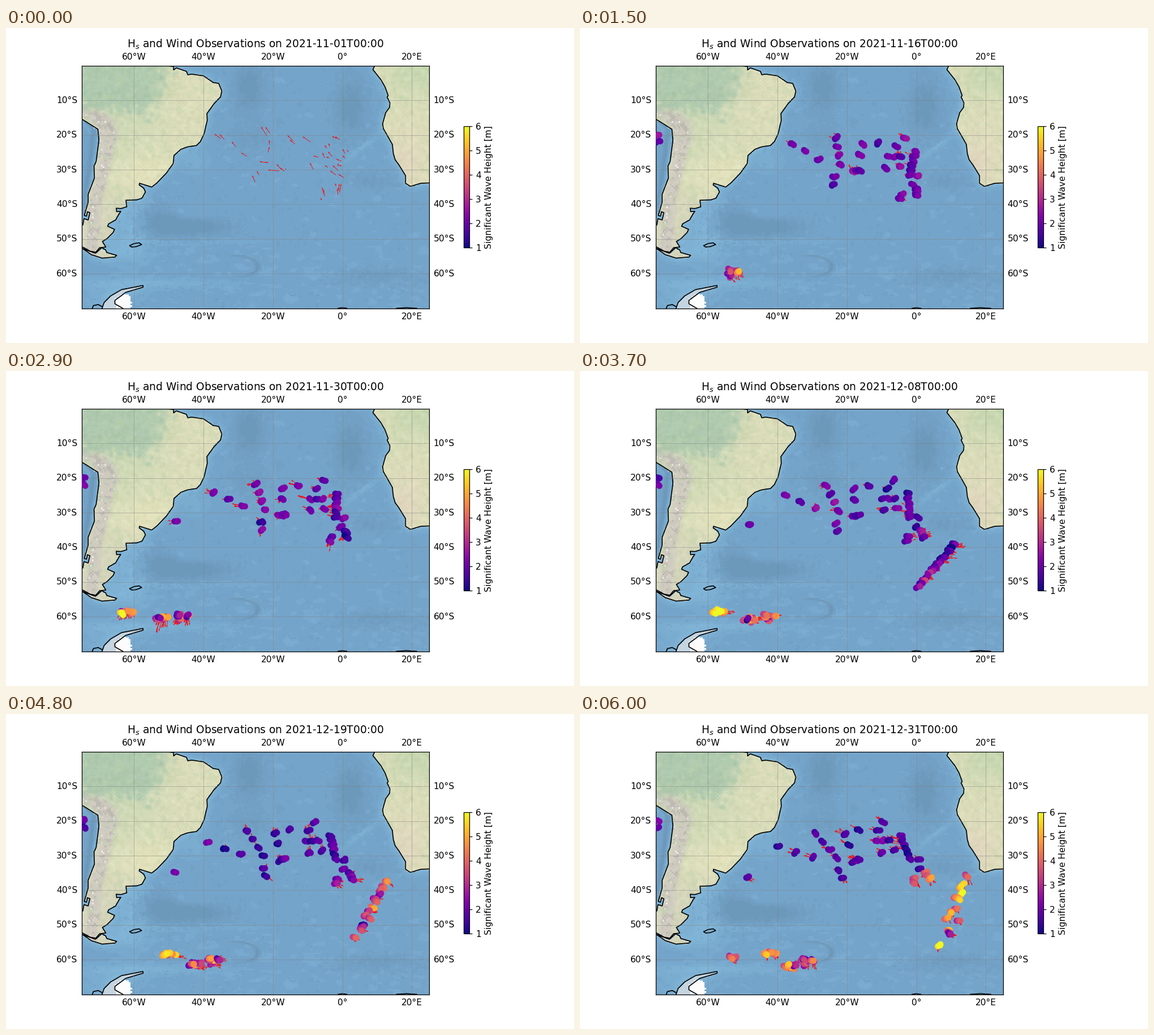
Write a matplotlib script that moves like this. It is 1004 by 558 pixels and loops after 6100 ms.

```python
import numpy as np
import matplotlib.pyplot as plt
from matplotlib.animation import FuncAnimation
from matplotlib.path import Path

W, H, DPI = 1004, 558, 111.555
TOP, BOTTOM, RIGHT = .12 * H, .89 * H, .745 * W
DEG = (BOTTOM - TOP) / 70
LEFT = RIGHT - 100 * DEG

plt.rcParams["font.family"] = "DejaVu Sans"
fig = plt.figure(figsize=((W + .001) / DPI, (H + .001) / DPI), dpi=DPI, facecolor="white")


def panel(x0, y0, x1, y1):
    return fig.add_axes([x0 / W, 1 - y1 / H, (x1 - x0) / W, (y1 - y0) / H])


def label(x, y, text, **kw):
    return fig.text(x / W, 1 - y / H, text, **kw)


def project(points):
    return np.array(points) * (DEG, -DEG) + (LEFT + 75 * DEG, TOP)


# Simplified coastlines as longitude, latitude
ATLANTIC = project([
    (-50.4, 0), (-48.6, -.2), (-48.6, -1.2), (-47.8, -.6), (-44.9, -1.6), (-44.5, -2.6),
    (-43.4, -2.4), (-40, -2.9), (-37.2, -4.8), (-35.6, -5.1), (-34.7, -7.3), (-35.1, -9),
    (-37, -11), (-39, -13.8), (-38.9, -15.7), (-39.8, -19.6), (-40.9, -21.9), (-42, -23),
    (-44.6, -23.4), (-46.5, -24.1), (-48.5, -25.9), (-48.7, -28.2), (-50.7, -31),
    (-53.4, -33.8), (-54.9, -35), (-58.4, -33.9), (-58.5, -34.4), (-57.2, -35.3),
    (-56.7, -36.4), (-57.7, -38.2), (-59.2, -38.7), (-62.3, -38.8), (-62.1, -40.7),
    (-63.8, -41.2), (-65.1, -41.1), (-65, -42.1), (-63.8, -42), (-64.4, -42.9),
    (-65.3, -44.5), (-67.3, -45.6), (-67.6, -46.3), (-65.6, -47.2), (-66, -48.1),
    (-67.8, -49.9), (-69.1, -50.7), (-68.1, -52.3), (-69.9, -52.5), (-71, -53.8),
    (-72.6, -53.5), (-75, -52.2)])
PACIFIC = project([
    (-75.2, -15.3), (-73.4, -16.4), (-70.4, -18.3), (-70.1, -21.4), (-70.9, -27.6),
    (-71.5, -28.9), (-71.4, -32.4), (-73.2, -37.1), (-73.2, -39.3), (-74.3, -43.2),
    (-73.7, -43.4), (-73.4, -42.1), (-72.7, -42.4), (-73.2, -44.5), (-74.4, -44.1),
    (-74.7, -45.8), (-75.6, -46.6)])
FUEGO = project([
    (-74.7, -52.8), (-71.1, -54.1), (-69.3, -52.5), (-68.2, -53.1), (-67.8, -53.9),
    (-65, -54.7), (-65.5, -55.2), (-69.2, -55.5), (-72.3, -54.5), (-74.7, -52.8)])
FALKLANDS = project([(-61.2, -51.9), (-60, -51.3), (-58.5, -51.1), (-57.8, -51.6),
                     (-59.4, -52.2), (-60.7, -52.3), (-61.2, -51.9)])
AFRICA = project([
    (9.3, 0), (8.8, -1.1), (11.1, -4), (12.3, -6.1), (13.2, -8.6), (12.9, -9), (13.7, -10.7),
    (13.6, -12), (12.5, -13.5), (11.6, -16.7), (11.8, -18.1), (13.4, -20.9), (14.4, -22.7),
    (14.7, -25.4), (15.2, -27.1), (16.3, -28.6), (18.2, -31.7), (18.2, -33.9), (19.6, -34.8),
    (22.6, -33.9), (25.2, -33.8)])
PENINSULA = project([
    (-69.2, -70), (-68.6, -68.3), (-66.7, -66.4), (-63.6, -64.6), (-57.4, -63.4),
    (-57.4, -63.9), (-62.4, -65.4), (-65.5, -67.7), (-65.5, -68.7), (-63.2, -70)])
COASTS = [ATLANTIC, PACIFIC, FUEGO, FALKLANDS, AFRICA, PENINSULA,
          project([(-72, -70), (-71.7, -69.2), (-70.3, -68.9), (-69.2, -69.5)]),
          project([(-1.2, -70), (0, -69.8), (1.3, -70)]),
          project([(15.6, -70), (18.5, -69.8), (21.4, -70)])]


# Relief picture with half-degree cells
def blur(a, steps):
    for _ in range(steps):
        p = np.pad(a, 1, "edge")
        a = (p[:-2, 1:-1] + p[2:, 1:-1] + p[1:-1, :-2] + p[1:-1, 2:] + a) / 5
    return a


def relief():
    rng = np.random.default_rng(7)
    nx, ny = 200, 140
    x, y = np.meshgrid(LEFT + (np.arange(nx) + .5) * DEG / 2,
                       TOP + (np.arange(ny) + .5) * DEG / 2)
    cells = np.column_stack([x.ravel(), y.ravel()])
    img = np.full((ny, nx, 3), (117., 164., 202.))

    def inside(*parts):
        return Path(np.vstack(parts)).contains_points(cells).reshape(ny, nx)

    def blob(cx, cy, sx, sy):
        return np.exp(-((x - cx) / sx) ** 2 - ((y - cy) / sy) ** 2)

    def step(v):
        return 1 / (1 + np.exp(-np.clip(v, -30, 30)))

    def noise(steps, wide=1):
        a = blur(rng.normal(size=(ny, nx)), steps)
        a = sum(np.roll(a, k, 1) for k in range(wide))
        return a / a.std()

    def mix(color, weight):
        img[:] += np.clip(weight, 0, 1)[..., None] * (np.array(color) - img)

    america = inside([(LEFT - 20, TOP)], ATLANTIC, PACIFIC[::-1]) | inside(FUEGO)
    africa = inside(AFRICA, [(RIGHT + 9, TOP)])
    ice = inside(PENINSULA)
    land = america | africa | ice

    shelf = blur(land.astype(float), 14) * 2.2
    shelf += .9 * blob(222, 350, 28, 55) + .6 * blob(205, 395, 45, 18)
    shelf += .7 * blob(250, 452, 130, 9) + .5 * blob(180, 470, 60, 25)
    shelf += .45 * blob(320, 378, 130, 6) + .5 * blob(330, 235, 28, 22)
    walvis = np.exp(-((y - 222 + .75 * (x - 615)) / 7) ** 2) * blob(628, 212, 34, 40)
    mix((128, 180, 215), np.round(np.clip(shelf + .75 * walvis, 0, 1) * 4) / 4)
    mix((126, 175, 211), .6 * ((noise(2, 4) > 1.75) & (blob(470, 300, 260, 230) > .2)))
    mix((126, 175, 211), .5 * ((noise(2, 5) > 1.1) & (y > 385)))

    basins = (blob(430, 105, 25, 45) + blob(610, 140, 26, 48) + blob(280, 342, 38, 27)
              + blob(345, 352, 50, 18) - .8 * blob(325, 325, 35, 14)
              + .5 * blob(640, 270, 40, 14) + .5 * blob(660, 440, 75, 14)
              + .4 * blob(430, 195, 35, 25))
    mix((108, 152, 186), np.round((1.2 * basins + .1 * noise(1)) * 3) / 3)
    arc = np.exp(-((np.hypot((x - 405) / 40, (y - 422) / 19) - 1) / .12) ** 2)
    mix((104, 143, 172), .65 * arc * step((x - 400) / 5) * step((440 - y) / 3))
    trench = np.interp(y, [160, 180, 250, 330], [134, 156, 148, 134])
    mix((103, 145, 178), .7 * np.exp(-((x - trench) / 5) ** 2) * (y > 165) * (y < 330))

    # Land is tinted on a copy so that tints stop at the coast
    sea = img.copy()
    img[:] = (220, 221, 186)
    mix((203, 216, 180), .8 * step((262 - x) / 18) * step((245 - y) / 18))
    rough = 8 * noise(2)
    mix((174, 201, 174), step((292 - x - .35 * (y - 67) + rough) / 7)
        * step((152 - y + rough) / 5))
    mix((227, 226, 188), blob(250, 260, 45, 40))
    mix((211, 212, 188), .8 * step((y - 300) / 12) * (x < 300))
    ridge = np.interp(y, [140, 165, 190, 240, 300, 400], [142, 172, 181, 174, 160, 150])
    width = np.interp(y, [140, 190, 230, 300], [25, 20, 13, 11])
    chain = np.exp(-((x - ridge) / width) ** 4) * step((y - 147) / 4) * (x < 260)
    mix((207, 201, 193), .9 * chain)
    mix((180, 175, 170), .6 * chain * (noise(1) > .8))
    mix((240, 240, 238), .8 * chain * (noise(0) > 1.9))
    mix((201, 216, 178), step((x - 680) / 12) * step((118 - y) / 12))
    mix((225, 212, 190), .8 * blob(705, 235, 28, 45))
    img[:] += (noise(1) * 3)[..., None] * np.array([1, .9, 1.1])
    mix((190, 212, 170), .35 * (noise(2) > 1.2))
    img[:] = np.where((america | africa)[..., None], img, sea)
    mix((214, 222, 228), .8 * ice)
    mix((252, 252, 252), blob(208, 488, 15, 20) + .06 * noise(1) > .45)
    return np.clip(img, 0, 255).astype(np.uint8)


ax = panel(LEFT, TOP, RIGHT, BOTTOM)
ax.imshow(relief(), extent=(LEFT, RIGHT, BOTTOM, TOP), aspect="auto", interpolation="nearest")
for coast in COASTS:
    ax.plot(*coast.T, color="black", lw=1.1, zorder=2)
ax.set(xlim=(LEFT, RIGHT), ylim=(BOTTOM, TOP), xticks=[], yticks=[])

PAD = 5 * DPI / 72
grid = dict(color="gray", lw=.6, alpha=.5, zorder=2.5)
for lon in range(-60, 21, 20):
    gx = LEFT + (lon + 75) * DEG
    ax.axvline(gx, **grid)
    name = f"{abs(lon)}°" + ("W" if lon < 0 else "E" if lon else "")
    label(gx, TOP - PAD, name, ha="center", va="bottom")
    label(gx, BOTTOM + PAD, name, ha="center", va="top")
for lat in range(10, 61, 10):
    gy = TOP + lat * DEG
    ax.axhline(gy, **grid)
    label(LEFT - PAD, gy, f"{lat}°S", ha="right", va="center")
    label(RIGHT + PAD, gy, f"{lat}°S", ha="left", va="center")

title = label((LEFT + RIGHT) / 2, 34.5, "", ha="center", va="baseline", fontsize=12)
dots = ax.scatter([], [], s=36, lw=1, c=[], cmap="plasma", vmin=1, vmax=6, zorder=4)
middle, half = (TOP + BOTTOM) / 2, (BOTTOM - TOP) / 4
bar = fig.colorbar(dots, cax=panel(808.5, middle - half, 808.5 + half / 10, middle + half),
                   ticks=range(1, 7))
bar.set_label("Significant Wave Height [m]")


# Drifting buoys
def strand(x0, y0, x1, y1, count):
    """Buoys strung out evenly between two points."""
    return np.linspace((x0, y0), (x1, y1), count)


def cloud(x, y, sx, sy, count):
    return (x, y) + np.random.default_rng(count).uniform(-1, 1, (count, 2)) * (sx, sy)


def fleet(home, home_day, velocity, height, start=0, spread=.3):
    return dict(home=home, home_day=home_day, velocity=velocity, height=height,
                spread=spread, start=np.broadcast_to(start, len(home)))


def gyre(home):
    """Anticlockwise circulation of the subtropical ocean, in pixels per day."""
    x, y = home.T
    return np.column_stack([.0144 * np.clip(y - 258, -60, 38), .0045 * np.clip(520 - x, -20, 140)])


def calm(day):
    return 2.25 - .012 * day


def late_swell(day):
    return calm(day) + 1.9 * np.clip((day - 52) / 8, 0, 1)


def storms(day):
    return 3 - np.cos(2 * np.pi * (day - 52) / 16)


north = np.vstack([
    strand(363, 220, 417, 243, 3), strand(435, 203, 457, 248, 4), strand(453, 270, 455, 284, 2),
    strand(484, 209, 485, 228, 2), strand(483, 258, 494, 255, 3), strand(510, 204, 543, 208, 2),
    strand(535, 226, 557, 226, 3), strand(537, 247, 561, 243, 2), strand(580, 217, 583, 258, 6),
    strand(555, 193, 555, 193, 1), strand(598, 260, 594, 276, 2)])
south = np.vstack([strand(603, 283, 607, 294, 3), strand(580, 293, 577, 301, 2)])
cape = strand(662, 306, 598, 382, 14)
cape_drift = strand(10, -18, 48, 23, 14) / 23 + cloud(0, 0, .7, .3, 14)

FLEETS = [
    fleet(north, 37, gyre(north), calm),
    fleet(south, 37, gyre(south), late_swell, spread=.5),
    fleet(strand(138, 189, 138, 201, 2), 15, (0, 0), calm, start=1),
    fleet(strand(301, 266, 301, 266, 1), 29, (-.15, .75), calm, start=27),
    fleet(cloud(277, 437, 11, 3, 7), 29, (3.1, .3), lambda day: 3.5, start=20, spread=.8),
    fleet(cloud(356, 436, 12, 6, 8), 44, (2.9, .1), lambda day: 3.3, start=8, spread=.8),
    fleet(cloud(216, 427, 12, 2, 5), 29, (3.95, -.1), lambda day: 4.6, start=27, spread=.7),
    fleet(cloud(225, 430, 6, 3, 3), 52, (5.8, .2), lambda day: 3.8, start=49, spread=.8),
    fleet(cape, 37, cape_drift, storms, start=31 + .4 * np.arange(14), spread=.8),
]

# Mean wind on a few days, as pixels right and down
WIND_DAYS = [0, 15, 29, 37, 44, 52, 60]
TRADES = [(-9, -8), (-7, -6), (-14, -2), (-8, -2), (3, -13), (-9, -3), (-15, -6)]
WESTERLIES = [(2, -13), (8, 8), (-4, 14), (13, 0), (9, 7), (17, 3), (4, 9)]


def mean_wind(day, y):
    trades, westerlies = ([np.interp(day, WIND_DAYS, part) for part in zip(*keys)]
                          for keys in (TRADES, WESTERLIES))
    blend = np.clip((y - 265) / 25, 0, 1)[..., None]
    return (1 - blend) * trades + blend * westerlies


def observe(number, day):
    """Positions, wave heights and winds of one fleet's reports on one day."""
    f = FLEETS[number]
    rng = np.random.default_rng([day, number])
    n, reports = len(f["home"]), np.linspace(-.5, .5, 4)
    place = f["home"] + (day - f["home_day"]) * np.broadcast_to(f["velocity"], (n, 2))
    heading = rng.uniform(-.8, .8, n)
    trail = 6 * np.column_stack([np.cos(heading), np.sin(heading)])
    points = place[:, None] + reports[:, None] * trail[:, None] + rng.normal(0, .7, (n, 4, 2))
    heights = f["height"](day) + f["spread"] * (rng.normal(size=(n, 1)) + 1.3 * reports)
    wind = mean_wind(day, points[..., 1]) * rng.uniform(.3, 1.2, (n, 1, 1))
    wind = wind + rng.normal(0, 2.5, (n, 1, 2)) + rng.normal(0, 2, (n, 4, 2))
    live = day >= f["start"]
    return points[live].reshape(-1, 2), heights[live].ravel(), wind[live].reshape(-1, 2)


arrows = []


def draw(day):
    reports = (observe(number, day) for number in range(len(FLEETS)))
    points, heights, wind = map(np.concatenate, zip(*reports))
    if arrows:
        arrows.pop().remove()
    # Only winds are reported on the first day
    shown = slice(None, None, 1 if day else 3)
    arrows.append(ax.quiver(*points[shown].T, *wind[shown].T, color="red", units="dots",
                            width=.8, angles="xy", scale_units="xy", scale=1, zorder=3))
    dots.set_offsets(points if day else np.empty((0, 2)))
    dots.set_array(heights if day else np.empty(0))
    title.set_text(f"H$_s$ and Wind Observations on {np.datetime64('2021-11-01') + day}T00:00")
    return dots, title


anim = FuncAnimation(fig, draw, frames=61, interval=100, repeat=True, repeat_delay=0, blit=False)
plt.show()
```
